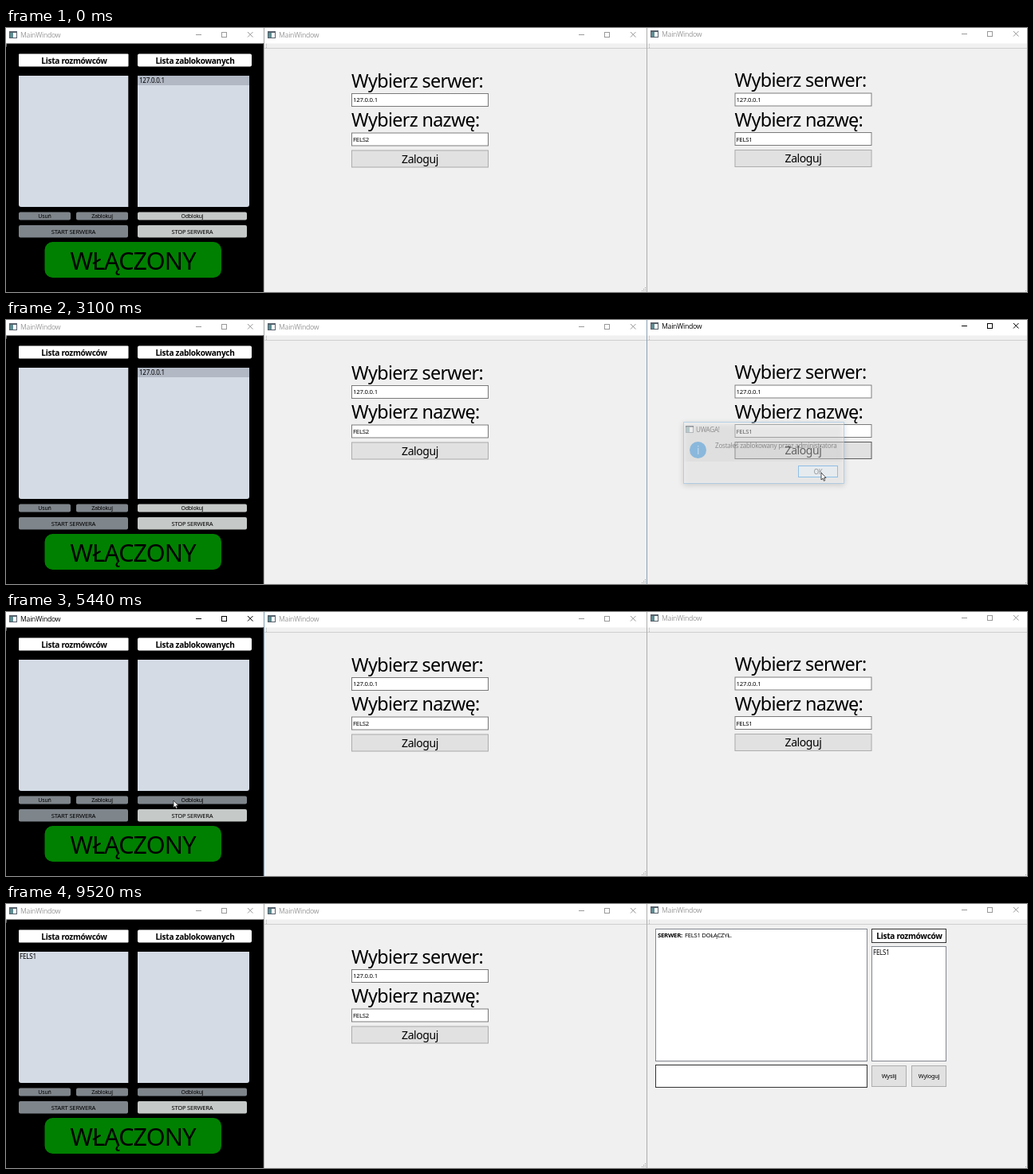
Write an HTML page with a canvas that moves like this. It is 1280 by 332 pixels and loops after 9610 ms.

```html
<!DOCTYPE html>
<html lang="pl">
<head>
<meta charset="utf-8">
<style>
html, body { margin: 0; height: 100%; overflow: hidden; background: #f0f0f0; }
canvas { display: block; }
</style>
</head>
<body>
<canvas id="stage" width="1280" height="332"></canvas>
<script>
const c = document.getElementById('stage').getContext('2d', { alpha: false });
const LOOP = 9610;
const UI = '"Noto Sans", sans-serif', CAPTION = '"Open Sans", sans-serif';

// Pointer path: time, x, y
const PATH = [
  [70, 840, 331], [300, 857, 290], [450, 857, 290], [1380, 917, 178], [1500, 936, 165],
  [2100, 936, 165], [2700, 1022, 192], [3250, 1022, 192], [3880, 192, 215], [4270, 172, 210],
  [4500, 165, 207], [4730, 147.5, 209], [5100, 214, 240], [5440, 210, 237], [5820, 210, 237],
  [6430, 949.5, 187], [6600, 949.5, 187], [6830, 952.5, 165], [7600, 952.5, 165],
  [8400, 1100, 212], [8600, 1100, 212], [8900, 1229, 251], [9520, 1229, 251]
];

const ramp = (t, a, b) => Math.min(1, Math.max(0, (t - a) / (b - a)));
const within = (t, a, b) => t >= a && t < b;

function box(x, y, w, h, fill, stroke) {
  c.fillStyle = fill;
  c.fillRect(x, y, w, h);
  if (stroke) outline(x, y, w, h, stroke);
}

function outline(x, y, w, h, color) {
  c.strokeStyle = color;
  c.lineWidth = 1;
  c.strokeRect(x + .5, y + .5, w - 1, h - 1);
}

function rounded(x, y, w, h, radius, fill) {
  c.fillStyle = fill;
  c.beginPath();
  c.roundRect(x, y, w, h, radius);
  c.fill();
}

// y is the middle of the capital letters
function text(s, x, y, size, { align = 'left', color = '#000', weight = 400, font = UI } = {}) {
  c.font = `${weight} ${size}px ${font}`;
  c.letterSpacing = `${-.03 * size}px`;
  c.textAlign = align;
  c.fillStyle = color;
  c.fillText(s, x, y + .357 * size);
}

const centered = (s, x, y, size, weight) => text(s, x, y, size, { align: 'center', weight });

function button(x, y, w, h, label, size, hover = 0, focus = false) {
  if (hover < 1) box(x, y, w, h, '#e1e1e1', focus ? '#5c5c5c' : '#adadad');
  if (hover) {
    const alpha = c.globalAlpha;
    c.globalAlpha *= hover;
    box(x, y, w, h, '#e5f1fb', '#0078d7');
    c.globalAlpha = alpha;
  }
  centered(label, x + w / 2, y + h / 2 + .2, size);
}

function windowIcon(x, y) {
  box(x, y, 10, 9, '#fff', '#56606a');
  box(x, y, 10, 2, '#56606a');
  box(x + 1, y + 2, 4, 6, '#5d8c92');
}

function titleBar(x, w, buttonsX, active, y = 8) {
  const color = active ? '#000' : '#999';
  box(x, 0, w, 19.5, '#fff');
  windowIcon(x + 4, y - 4);
  text('MainWindow', x + 18, y + .5, 8.7, { color, font: CAPTION });
  c.strokeStyle = color;
  c.lineWidth = 1;
  c.strokeRect(buttonsX + 32.5, y - 2.5, 6, 6);
  c.beginPath();
  c.moveTo(buttonsX, y + .5);
  c.lineTo(buttonsX + 7, y + .5);
  c.moveTo(buttonsX + 65, y - 3);
  c.lineTo(buttonsX + 71.5, y + 3.5);
  c.moveTo(buttonsX + 71.5, y - 3);
  c.lineTo(buttonsX + 65, y + 3.5);
  c.stroke();
}

function serverWindow(t) {
  const active = within(t, 3960, 7060), blocked = t < 5300;
  const ON = '#c5c9c7', OFF = '#7e858b', LIST = '#d4dbe5';
  box(0, 0, 323, 332, '#000');
  titleBar(0, 323, 238, active);
  box(0, 20, 1, 1, '#ccc');
  box(0, 22, 1, 1, '#ccc');
  rounded(16, 32.5, 137.5, 16, 1, '#fff');
  rounded(165, 32.5, 143, 16, 2, '#fff');
  centered('Lista rozmówców', 85.5, 41, 10.1, 700);
  centered('Lista zablokowanych', 237, 41, 10.1, 700);
  rounded(16, 60, 137.3, 165, [0, 0, 0, 3], LIST);
  rounded(165, 60, 140, 165, [0, 0, 3, 0], LIST);
  if (blocked) {
    box(165, 60, 140, 12, active ? '#a7caea' : '#b2b9c5');
    text('127.0.0.1', 167, 66.5, 8);
  }
  if (t >= 7100) text('FELS1', 17, 66.5, 8.2);

  const flat = (x, y, w, h, label, size, on) => {
    rounded(x, y, w, h, 2, on ? ON : OFF);
    centered(label, x + w / 2, y + h / 2 + .3, size);
  };
  flat(16, 231.5, 65, 10, 'Usuń', 7);
  flat(88, 231.5, 65, 10, 'Zablokuj', 7);
  flat(165, 231.5, 137, 10, 'Odblokuj', 6.9, blocked);
  flat(16, 248, 137, 15.5, 'START SERWERA', 7.7);
  flat(165, 248, 137, 15.5, 'STOP SERWERA', 7.6, true);
  rounded(48.5, 269, 221.5, 45, 10, '#008000');
  centered('WŁĄCZONY', 159, 293, 30.6);
}

function clientFrame(x, w, buttonsX, active, y) {
  box(x, 0, w, 332, '#f0f0f0');
  titleBar(x, w, buttonsX, active, y);
  box(x, 25, w, 1, '#cfcfcf');
  for (let i = 0; i < 3; i++) box(x + 2, 20 + 2 * i, 1, 1, '#b5b5b5');
}

function grip(x) {
  for (let i = 0; i < 3; i++)
    for (let j = 0; j <= i; j++) box(x - 2 * j, 326 + 2 * i, 1, 1, '#a5a5a5');
}

function login(x, y, name, hover, focus) {
  c.save();
  c.translate(x, y);
  text('Wybierz serwer:', 0, 66.5, 23.4);
  box(0, 82, 172, 17, '#fff', '#7a7a7a');
  text('127.0.0.1', 2, 90.5, 7.8);
  text('Wybierz nazwę:', 0, 116, 23.4);
  box(0, 131.5, 172, 17, '#fff', '#7a7a7a');
  text(name, 2, 140.3, 7.8);
  button(0, 153.5, 172, 22, 'Zaloguj', 14, hover, focus);
  c.restore();
}

function chat(t) {
  const active = t < 9520, moved = t >= 8500;
  box(814, 31, 266, 167, '#fff', '#828790');
  text('SERWER:', 817, 39, 7.7, { weight: 700 });
  text('FELS1 DOŁĄCZYŁ.', 851, 39, 7.6);
  box(1085, 31, 94, 18, '#fff', '#333');
  centered('Lista rozmówców', 1132.5, 40.5, 10.1, 700);
  box(1085, 53, 94, 145, '#fff', '#828790');
  text('FELS1', 1087, 61.3, 8);
  box(814, 202, 266, 29, '#fff', '#333');
  const hover = ramp(t, 8320, 8480) * (1 - ramp(t, 8620, 8780));
  button(1085, 203, 44, 27, 'Wyslij', 7.4, hover, active && moved);
  button(1135, 203, 44, 27, 'Wyloguj', 7.4, 0, active && !moved);
}

function dialog(t) {
  const alpha = ramp(t, 1860, 2060) * (1 - ramp(t, 2940, 3200));
  if (!alpha) return;
  c.save();
  c.globalAlpha = alpha;
  c.shadowColor = 'rgba(0,0,0,.4)';
  c.shadowBlur = 7;
  c.shadowOffsetY = 2;
  box(849, 128, 202, 78, '#fff');
  c.shadowColor = 'transparent';
  outline(849, 128, 202, 78, '#5a9fd8');
  box(850, 178, 200, 27, '#f0f0f0');
  windowIcon(852, 133);
  text('UWAGA!', 865, 138, 8.1, { font: CAPTION });
  c.fillStyle = '#0078d7';
  c.beginPath();
  c.arc(867.5, 163.5, 10.5, 0, 2 * Math.PI);
  c.fill();
  box(867, 158, 1.5, 1.5, '#fff');
  box(867, 161, 1.5, 8, '#fff');
  text('Zostałeś zablokowany przez administratora', 889, 158.5, 8.1, { font: CAPTION });
  button(993, 183, 50, 15, 'OK', 8, ramp(t, 2520, 2680), true);
  c.restore();
}

function pointer(t) {
  const i = PATH.findIndex(p => p[0] > t);
  if (i < 1) return;
  const [a, x0, y0] = PATH[i - 1], [b, x1, y1] = PATH[i];
  const k = ramp(t, a, b), e = k * k * (3 - 2 * k);
  c.save();
  c.translate(x0 + (x1 - x0) * e, y0 + (y1 - y0) * e);
  c.beginPath();
  [[0, 0], [0, 9], [2, 7.2], [3.4, 10.3], [4.8, 9.7], [3.5, 6.6], [6, 6.4]].forEach(p => c.lineTo(...p));
  c.closePath();
  c.fillStyle = '#fff';
  c.fill();
  c.strokeStyle = '#222';
  c.lineWidth = .8;
  c.stroke();
  c.restore();
}

function draw(t) {
  const rightActive = within(t, 1720, 1860) || within(t, 2940, 3960) || within(t, 7060, 9520);
  const leftActive = within(t, 3960, 7060);
  serverWindow(t);
  clientFrame(324, 480, 718, false, 8);
  grip(801);
  login(433, 0, 'FELS2', 0, false);
  clientFrame(804, 476, 1198, rightActive, 7);
  grip(1282);
  box(322, 19.5, 1, 313, leftActive ? '#14304a' : '#222');
  box(323, 0, 1, 332, leftActive ? '#7f9fb8' : '#aaa');
  box(803, 0, 1, 332, rightActive ? '#8aa0b4' : '#adadad');
  if (t < 7140) {
    const hover = t < 1860 ? ramp(t, 1480, 1640) : ramp(t, 6660, 6820);
    login(913.5, -.5, 'FELS1', hover, rightActive);
  } else chat(t);
  dialog(t);
  pointer(t);
}

function tick() {
  draw(performance.now() % LOOP);
  requestAnimationFrame(tick);
}
tick();
</script>
</body>
</html>
```
